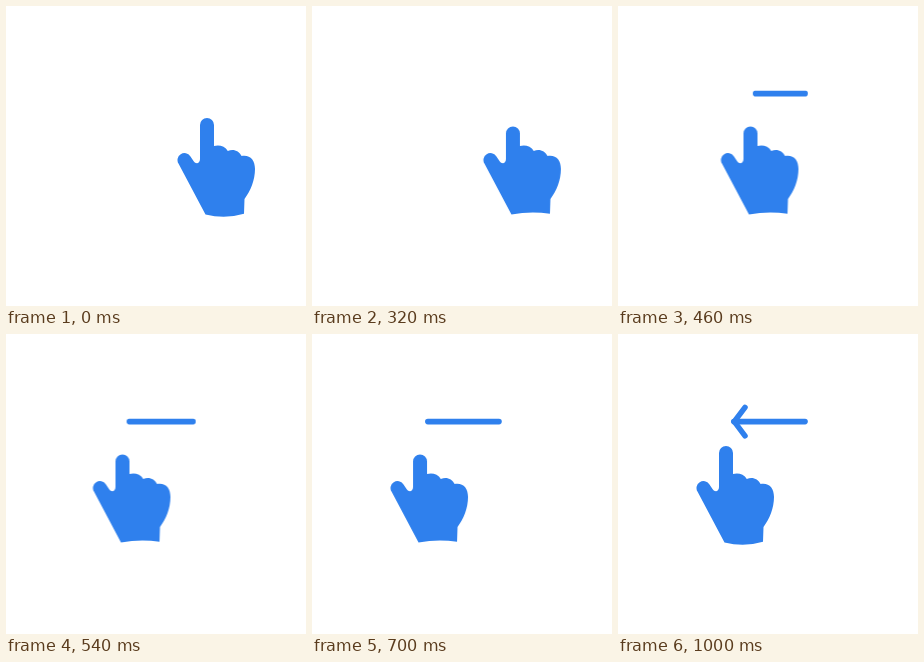
Recreate the animation shown at these times as an HTML page. Size 300 by 300 pixels, loop 1200 ms.

```html
<!DOCTYPE html>
<html lang="en">
<head>
<meta charset="utf-8">
<title>Swipe left</title>
<style>
  html, body { margin: 0; width: 100%; height: 100%; overflow: hidden; background: #fff; }
  svg { display: block; width: 100%; height: 100%; }

  .slide, .hand, .line, .head {
    animation: 1200ms cubic-bezier(.333, 0, 0, 1) infinite;
  }
  .slide { animation-name: slide; }
  .hand { fill: #2f80ed; animation-name: press; }
  .line { fill: #2f80ed; transform-origin: 189.8px 87.6px; animation-name: draw; }
  .head {
    fill: none; stroke: #2f80ed; stroke-width: 5.5; stroke-linecap: round;
    animation-name: open; animation-timing-function: cubic-bezier(.333, 0, .36, 1);
  }

  @keyframes slide {
    0%, 26.167% { transform: translateX(0); }
    59.5%, 100% { transform: translateX(-93px); }
  }

  /* The fingertip drops and the wrist edge arches while pressing. */
  @keyframes press {
    0%, 15.417%, 83.333%, 100% {
      d: path("M194 119A7 7 0 0 1 208 119L208 140C213 138.5 219 140 221.8 145C227 142.5 233 144.5 235.6 150C244 148.5 249 154 249 163C249 174 244.5 185 238.5 193L238 207.8Q219 213.5 199.5 208.5L172.6 157.8A6.9 6.9 0 0 1 184.3 150.3L187.5 155C190 158.8 194 157.5 194 153Z");
    }
    27.083%, 60% {
      d: path("M194 127.4A7 7 0 0 1 208 127.4L208 140C213 138.5 219 140 221.8 145C227 142.5 233 144.5 235.6 150C244 148.5 249 154 249 163C249 174 244.5 185 238.5 193L238 207.8Q219 204.8 199.5 208.5L172.6 157.8A6.9 6.9 0 0 1 184.3 150.3L187.5 155C190 158.8 194 157.5 194 153Z");
    }
  }

  @keyframes draw {
    0%, 26.667% { transform: scaleX(0); }
    60%, 100% { transform: scaleX(1); }
  }

  @keyframes open {
    0%, 61.66% { visibility: hidden; d: path("M136 87.6L116.3 87.6L136 87.6"); }
    61.667% { visibility: visible; d: path("M136 87.6L116.3 87.6L136 87.6"); }
    83.333%, 100% { visibility: visible; d: path("M127 73.4L116.3 87.6L127 101.8"); }
  }
</style>
</head>
<body>
<svg viewBox="0 0 300 300">
  <rect class="line" x="113" y="84.8" width="76.8" height="5.6" rx="2.8"/>
  <path class="head"/>
  <g class="slide"><path class="hand"/></g>
</svg>
</body>
</html>
```
